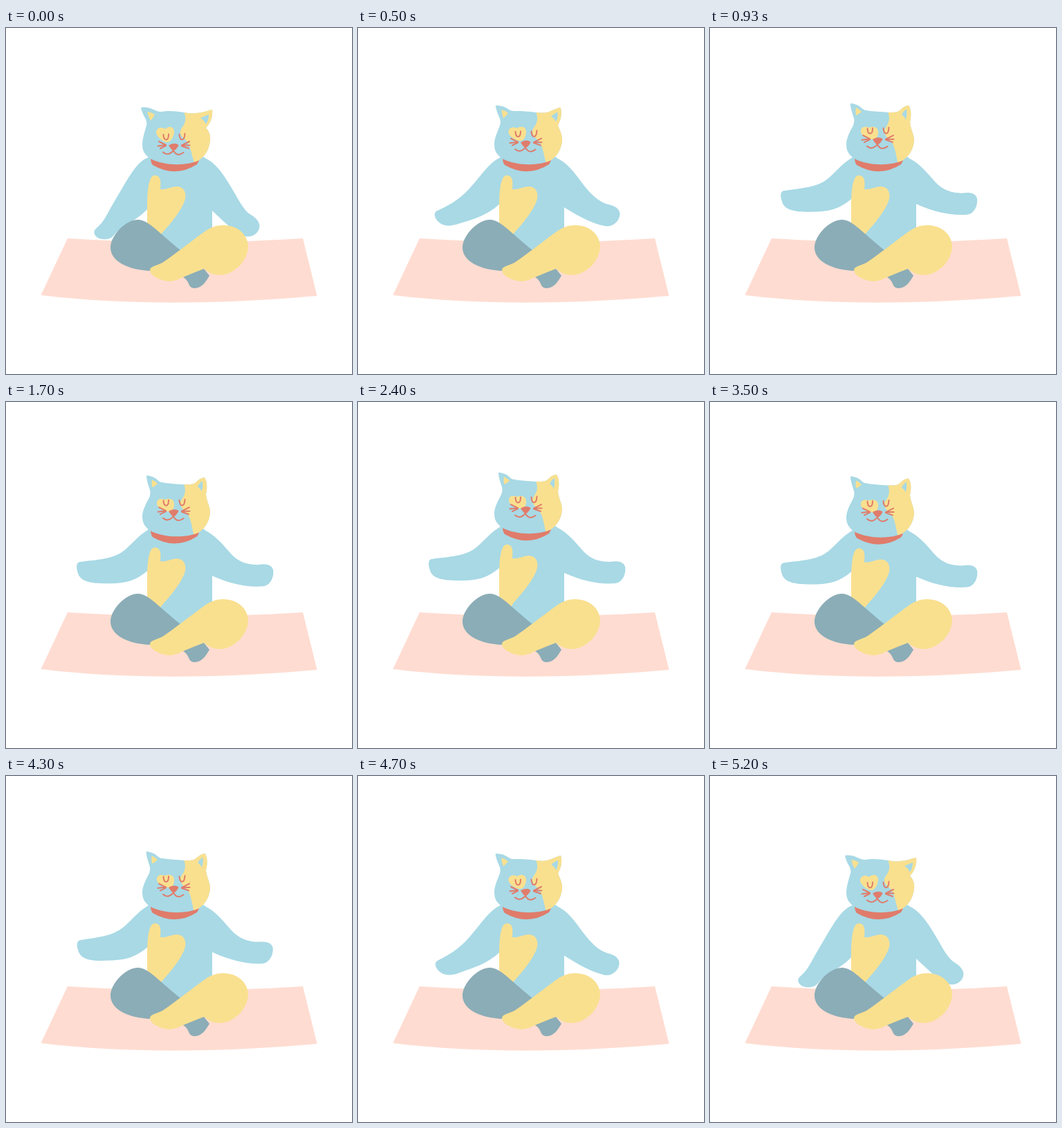
An HTML page that plays this animation: 500x500 px, repeating every 5.23 s.

```html
<!DOCTYPE html>
<html lang="en">
<head>
<meta charset="utf-8">
<title>Meditating cat</title>
<style>
  html, body { margin: 0; width: 100%; height: 100%; overflow: hidden; background: #fff; }
  svg { display: block; width: 100vw; height: 100vh; }
  .blue { fill: #a8d9e5; }
  .yellow { fill: #f9e08f; }
  .slate { fill: #8badb7; }
  .red { fill: #e07c6b; }
  .line { fill: none; stroke: #e07c6b; stroke-width: 2; stroke-linecap: round; stroke-linejoin: round; }
</style>
</head>
<body>
<svg viewBox="0 0 500 500">
  <defs><clipPath id="headClip"><path id="headEdge"/></clipPath></defs>
  <path fill="#ffdcd1" d="M89,304 Q260,315 429,304 L449.500,387 C330,398 180,402 50.500,386Z"/>

  <g id="torso">
    <path id="armL" class="blue"/>
    <path id="armR" class="blue"/>
    <path class="blue" d="M205,187 C212,184 275,183 287,187 L298,215 V300 L270,335 H230 L204,300 V215Z"/>
    <path class="yellow" d="M204,300 V262 C204,235 206,213 215,213 C224,213 224,222 223,233 C231,234 237,230 246,229 C256,229 261,236 259,247 C255,262 240,280 225,297 L215,312Z"/>
  </g>

  <path class="slate" d="M151,317 C151,301 172,277 191,277 C206,278 214,290 252,321 L270,335 L286,348 L294,358 C289,367 282,376 273,376 C262,376 267,367 256,360 L240,348 L210,351 C178,350 151,338 151,317Z"/>
  <path class="yellow" d="M208,350 C209,343 220,344 230,336.500 C252,321 270,306 286,295 C295,288 304,285 314,285 C336,285 350,300 350,316 C349,337 329,357 309,357 C299,357 294,354 286,348 C275,352 266,356 256,360 C248,364 242,366 235,366 C221,365 208,357 208,350Z"/>

  <g id="top">
    <path class="red" d="M209,188 Q244,200 279,190 Q279,193 276,197 Q245,217 212,198 Q209,194 209,188Z"/>
    <path id="head" class="blue"/>
    <path id="mask" class="yellow" clip-path="url(#headClip)"/>
    <path id="earL" class="yellow"/>
    <path id="earR" class="blue"/>
    <path id="spot" class="yellow"/>
    <g id="face">
      <path class="line" d="M227.500,154 C228,164 235,164 235,153.500 M250.500,153.500 C251,164 258,164 258.500,152.500"/>
      <path class="red" d="M236,169 Q242,165.500 248,168 Q250.500,169.500 248,172 Q245,177 242,177 Q240,177 237,172.500 Q234.500,170 236,169Z"/>
      <path class="line" d="M227,179.500 Q234,186 242,177 Q247,187 256.500,180"/>
      <path class="line" d="M221,164 L231,169 L219.500,170.500 M231,170 L223,174 M265,164 L254,169.500 L265.500,169.500 M254,170.500 L264,174"/>
    </g>
  </g>
</svg>
<script>
const LOOP = 5230, STEP = 70;
const $ = id => document.getElementById(id);
const nums = d => d.match(/-?[\d.]+/g).map(Number);
const fill = (d, list) => { let i = 0; return d.replace(/-?[\d.]+/g, () => list[i++].toFixed(2)); };

// Each shape has a resting pose and a raised pose with the same commands.
const shapes = {
  head: [
    "M195,115 C201,114 207,115 211,117 C216,119 219,121 224,121 C236,119 245,120 257,122 C263,123 268,124 274,123 C282,123 289,120 298,118 C299,128 296,137 289,144 C292,148 296,153 295,162 C294,174 289,184 279,191 C260,200 228,199 209,189 C200,183 197,177 197,168 C197,160 200,152 202,144 C204,139 204,136 201,130 C198,125 196,120 195,115Z",
    "M203,109 C207,109 213,111 216,113 C220,116 222,119 226,119 C238,121 246,121 257,122 C263,122 268,122 271,121 C276,119 279,112 287,112 C291,118 291,127 289,136 C290,147 295,153 295,163 C294,174 289,184 279,191 C260,200 228,199 209,189 C200,183 197,177 197,168 C197,160 202,150 207,141 C209,136 209,131 207,127 C205,121 203,115 203,109Z"],
  mask: [
    "M257,105 L257,121 C262,133 258,139 253,146 C250,152 253,157 260,162 C267,169 267,180 273,198 L310,200 L310,105Z",
    "M257,105 L257,121 C261,132 258,138 253,145 C250,151 254,157 261,163 C267,170 268,179 272,198 L310,200 L310,105Z"],
  earL: [
    "M204,121 Q211,122 215,125 Q212,131 209,134 Q206,128 204,121Z",
    "M211,115 Q216,117 219,121 Q215,125 211,126 Q210,120 211,115Z"],
  earR: [
    "M281,130 Q288,127 293,125 Q293,133 289,139 Q286,133 281,130Z",
    "M277,125 Q280,119 284,117 Q285,125 283,132 Q281,128 277,125Z"],
  spot: [
    "M217,151 C217,144 225,142 230,146 C235,141 243,142 243,150 C243,157 238,165 233,165 C228,165 217,157 217,151Z",
    "M218,149 C218,142 226,142 230,144 C235,141 243,143 243,150 C243,156 241,161 236,161 C230,161 218,157 218,149Z"]
};

const arms = {
  armL: { pivot: [205, 215], poses: [
    "M225,186 L206,187 C188,192 173,224 157,250 C146,268 143,279 130,290 C124,295 129,304 139,305 C148,306 153,304 158,297 C167,287 190,277 204,262 L225,230Z",
    "M225,186 L206,187 C190,196 179,212 167,220 C150,231 125,231 106,234 C100,236 102,245 105,253 C110,262 122,265 145,265 C170,265 185,263 204,247 L225,230Z"] },
  armR: { pivot: [292, 215], poses: [
    "M265,186 L285,187 C302,193 314,211 324,228 C335,245 342,263 354,270 C364,276 369,284 365,292 C360,302 348,304 338,298 C326,291 312,277 298,264 L270,230Z",
    "M265,186 L285,187 C300,193 313,208 325,222 C337,235 350,238 364,238 C376,236 384,238 386,245 C388,255 382,268 372,269 C350,271 325,266 298,254 L270,230Z"] }
};

function blend([from, to], p) {
  const a = nums(from), b = nums(to);
  return fill(from, a.map((v, i) => v + (b[i] - v) * p));
}

// Blend angle and radius around the shoulder so the hand travels on an arc.
function swing({ pivot: [px, py], poses: [from, to] }, p) {
  const a = nums(from), b = nums(to), out = [];
  for (let i = 0; i < a.length; i += 2) {
    const ax = a[i] - px, ay = a[i + 1] - py, bx = b[i] - px, by = b[i + 1] - py;
    const turn = Math.atan2(ax * by - ay * bx, ax * bx + ay * by);
    const angle = Math.atan2(ay, ax) + turn * p;
    const ra = Math.hypot(ax, ay), r = ra + (Math.hypot(bx, by) - ra) * p;
    out.push(px + r * Math.cos(angle), py + r * Math.sin(angle));
  }
  return fill(from, out);
}

// Cosine ease from 0 to 1 between two times.
function ease(t, start, end) {
  const k = Math.min(1, Math.max(0, (t - start) / (end - start)));
  return (1 - Math.cos(Math.PI * k)) / 2;
}

function draw(t) {
  const lift = ease(t, 0, 1000) - ease(t, 4100, 5200);
  const breath = 7 * (ease(t, 1100, 2430) - ease(t, 2430, 3950));
  for (const id in shapes) $(id).setAttribute("d", blend(shapes[id], lift));
  for (const id in arms) $(id).setAttribute("d", swing(arms[id], lift));
  $("headEdge").setAttribute("d", $("head").getAttribute("d"));
  $("face").setAttribute("transform", `translate(0 ${-9 * lift})`);
  for (const id of ["torso", "top"]) $(id).setAttribute("transform", `translate(0 ${-breath})`);
}

// Poses are 70 ms apart, shown on a 30 per second clock.
function poseTime(ms) {
  const tick = Math.floor((ms % LOOP + 4) * 0.03);
  return Math.floor(tick / 2.1 + 1e-6) * STEP;
}

const begin = performance.now();
let last = -1;
function loop() {
  const t = poseTime(performance.now() - begin);
  if (t !== last) draw(last = t);
  requestAnimationFrame(loop);
}
loop();
</script>
</body>
</html>
```
